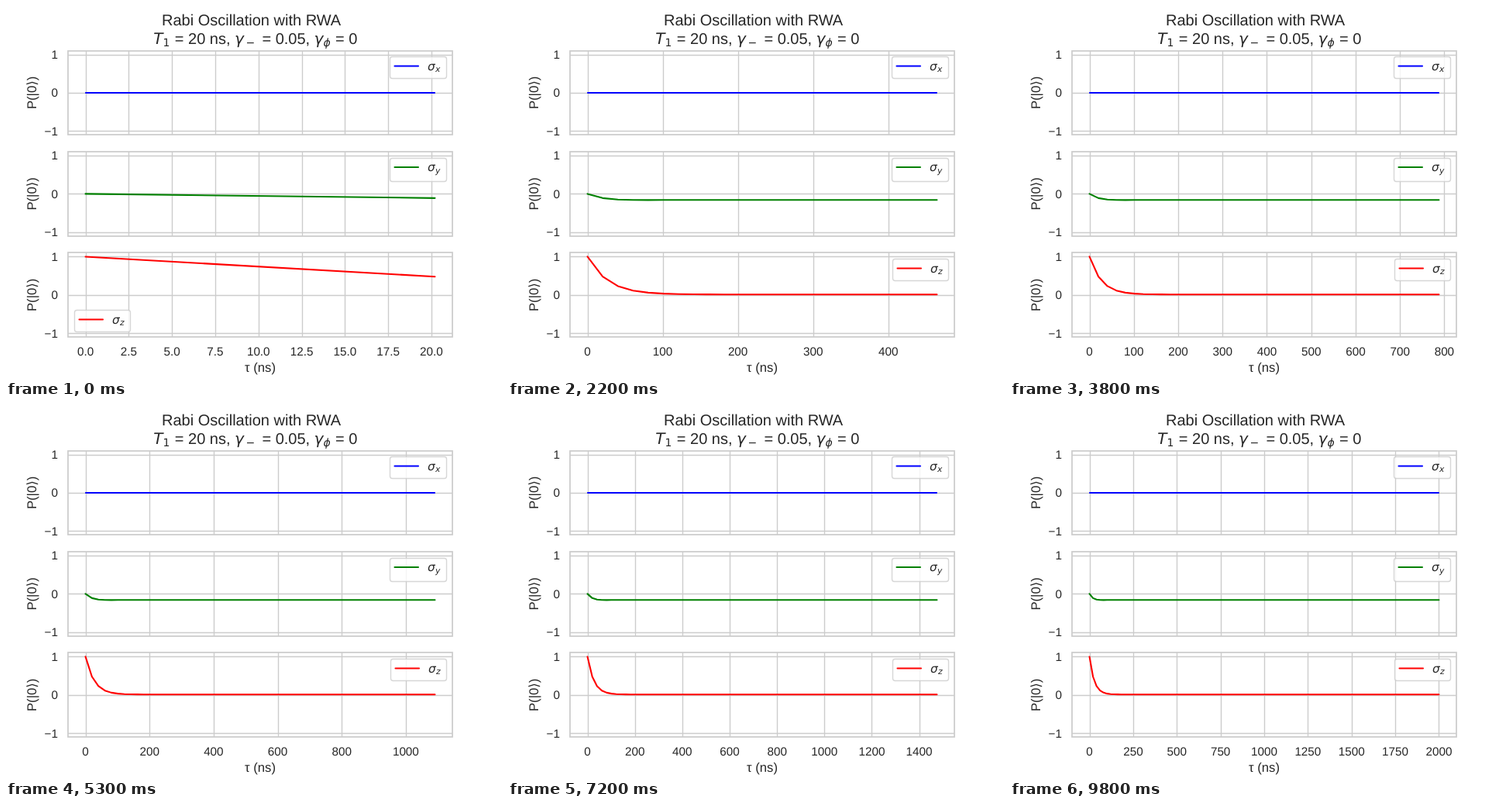
Write an HTML page that moves like this. It is 640x480 px and loops after 9900 ms.

```html
<!DOCTYPE html>
<html lang="en">
<head>
<meta charset="utf-8">
<title>Rabi Oscillation with RWA</title>
<style>
  html, body { margin: 0; width: 100%; height: 100%; overflow: hidden; background: #fff; }
  svg { display: block; width: 640px; height: 480px; }
  text { font-family: "Liberation Sans", Arial, sans-serif; fill: #262626; text-rendering: geometricPrecision; }
  .math { font-family: "DejaVu Sans", sans-serif; }
  .it { font-style: italic; }
  .grid { stroke: #ccc; stroke-width: 1.39; fill: none; }
  .frame { stroke: #ccc; stroke-width: 1.74; fill: none; }
  .curve { stroke-width: 2.08; fill: none; stroke-linecap: round; stroke-linejoin: round; }
  .box { fill: #fff; fill-opacity: .8; stroke: #ccc; stroke-opacity: .8; stroke-width: 1.39; }
</style>
</head>
<body>
<svg id="stage" viewBox="0 0 640 480"></svg>
<script>
const stage = document.getElementById('stage');
const LEFT = 80, RIGHT = 576, UNIT = 49.41;
const X0 = LEFT + 496 / 22, SPAN = 496 / 1.1;
const FRAMES = 99, STEP = 2000 / 99;

function add(tag, attrs, parent = stage, content) {
  const el = document.createElementNS('http://www.w3.org/2000/svg', tag);
  for (const k in attrs) el.setAttribute(k, attrs[k]);
  if (content !== undefined) el.textContent = content;
  parent.appendChild(el);
  return el;
}
const label = (s, x, y, size, attrs = {}, parent = stage) =>
  add('text', { x, y, 'font-size': size, ...attrs }, parent, s);
const snap = v => Math.floor(v + .5) + .5;

// Damped Bloch equations on resonance
const gamma = 0.05, omega = 2 * Math.PI / 20;
const zEnd = 1 / (1 + 2 * (omega / gamma) ** 2), yEnd = -2 * omega / gamma * zEnd;
function bloch(t) {
  const a = gamma / 4, w = Math.sqrt(omega * omega - a * a);
  const e = Math.exp(-3 * a * t), c = Math.cos(w * t), s = Math.sin(w * t) / w;
  const u = 1 - zEnd, v = -yEnd;
  return {
    x: 0,
    y: yEnd + e * (v * c + (a * v - omega * u) * s),
    z: zEnd + e * (u * c + (omega * v - a * u) * s)
  };
}
const states = Array.from({ length: FRAMES + 1 }, (_, i) => bloch(i * STEP));

function legend(name, color, x, top, h) {
  const g = add('g', {});
  const w = 568.5 - x;
  add('rect', { class: 'box', x, y: top, width: w, height: h, rx: 3 }, g);
  const ly = top + (name === 'y' ? 11.5 : 12);
  add('path', { class: 'curve', stroke: color, d: `M${x + 6} ${ly}h30.5` }, g);
  label('σ', x + 48.6, ly + 5, 15.28, { class: 'math it' }, g);
  label(name, x + 58.4, ly + 7.5, 10.7, { class: 'math it' }, g);
  return g;
}

// Title
label('Rabi Oscillation with RWA', 201, 25, 20);
const plain = (s, x) => label(s, x, 49, 20);
const sym = (s, x) => label(s, x, 49, 20, { class: 'math it' });
const sub = (s, x, cls) => label(s, x, 52.3, 14, { class: cls });
sym('T', 190.3);
sub('1', 202.5, 'math');
plain('= 20 ns,', 217.8);
sym('γ', 295.1);
sub('−', 309.6, 'math');
plain('= 0.05,', 330.4);
sym('γ', 397.6);
sub('ϕ', 409.4, 'math it');
plain('= 0', 425);

const panels = [
  { key: 'x', color: '#0000ff', top: 58, bottom: 166, mid: 111.95, box: [495.5, 65.5, 28] },
  { key: 'y', color: '#008000', top: 188, bottom: 297, mid: 242.4, box: [495.5, 196.5, 30] },
  { key: 'z', color: '#ff0000', top: 318, bottom: 427, mid: 372.85, box: [496.5, 326.5, 28] }
];

for (const p of panels) {
  p.grid = add('path', { class: 'grid' });
  p.rows = '';
  for (const v of [1, 0, -1]) {
    const y = p.mid - v * UNIT;
    p.rows += `M${LEFT} ${snap(y)}H${RIGHT}`;
    label(v < 0 ? '−1' : v, 67, Math.round(y + 5.3), 15.28, { 'text-anchor': 'end' });
  }
  p.line = add('path', { class: 'curve', stroke: p.color });
  add('rect', { class: 'frame', x: LEFT, y: p.top, width: RIGHT - LEFT, height: p.bottom - p.top });
  p.legend = legend(p.key, p.color, ...p.box);

  const axis = label('', 0, 0, 16.67, { 'text-anchor': 'middle', transform: `translate(39 ${p.mid}) rotate(-90)` });
  add('tspan', {}, axis, 'P(|0');
  add('tspan', { class: 'math' }, axis, '⟩');
  add('tspan', {}, axis, ')');
}
label('τ (ns)', 328, 472, 16.67, { 'text-anchor': 'middle' });

const ticks = Array.from({ length: 11 }, () => label('', 0, 451, 15.28, { 'text-anchor': 'middle' }));

// Smallest round step that leaves at most nine intervals
function tickStep(lo, hi) {
  const raw = (hi - lo) / 9;
  const scale = 10 ** Math.floor(Math.log10(raw));
  return [1, 2, 2.5, 5, 10].map(s => s * scale).find(s => s >= raw);
}

function draw(frame) {
  const n = frame + 1, max = n * STEP;
  const hi = max + max * .05, step = tickStep(-max * .05, hi);
  const px = t => X0 + t / max * SPAN;

  const cols = [];
  ticks.forEach((el, i) => {
    const t = i * step, on = t <= hi;
    el.textContent = on ? t.toFixed(step % 1 ? 1 : 0) : '';
    if (on) {
      el.setAttribute('x', px(t).toFixed(2));
      cols.push(snap(px(t)));
    }
  });

  for (const p of panels) {
    p.grid.setAttribute('d', p.rows + cols.map(x => `M${x} ${p.top}V${p.bottom}`).join(''));
    let d = 'M103 112H553';
    if (p.key !== 'x') {
      d = 'M' + states.slice(0, n + 1).map((s, i) =>
        px(i * STEP).toFixed(2) + ' ' + (p.mid - s[p.key] * UNIT).toFixed(2)).join('L');
    }
    p.line.setAttribute('d', d);
  }
  // The first curve still fills the upper right corner
  panels[2].legend.setAttribute('transform', frame ? '' : 'translate(-408 66)');
}

let shown = -1;
function tick() {
  const frame = Math.floor(performance.now() / 100) % FRAMES;
  if (frame !== shown) draw(shown = frame);
  requestAnimationFrame(tick);
}
tick();
</script>
</body>
</html>
```
